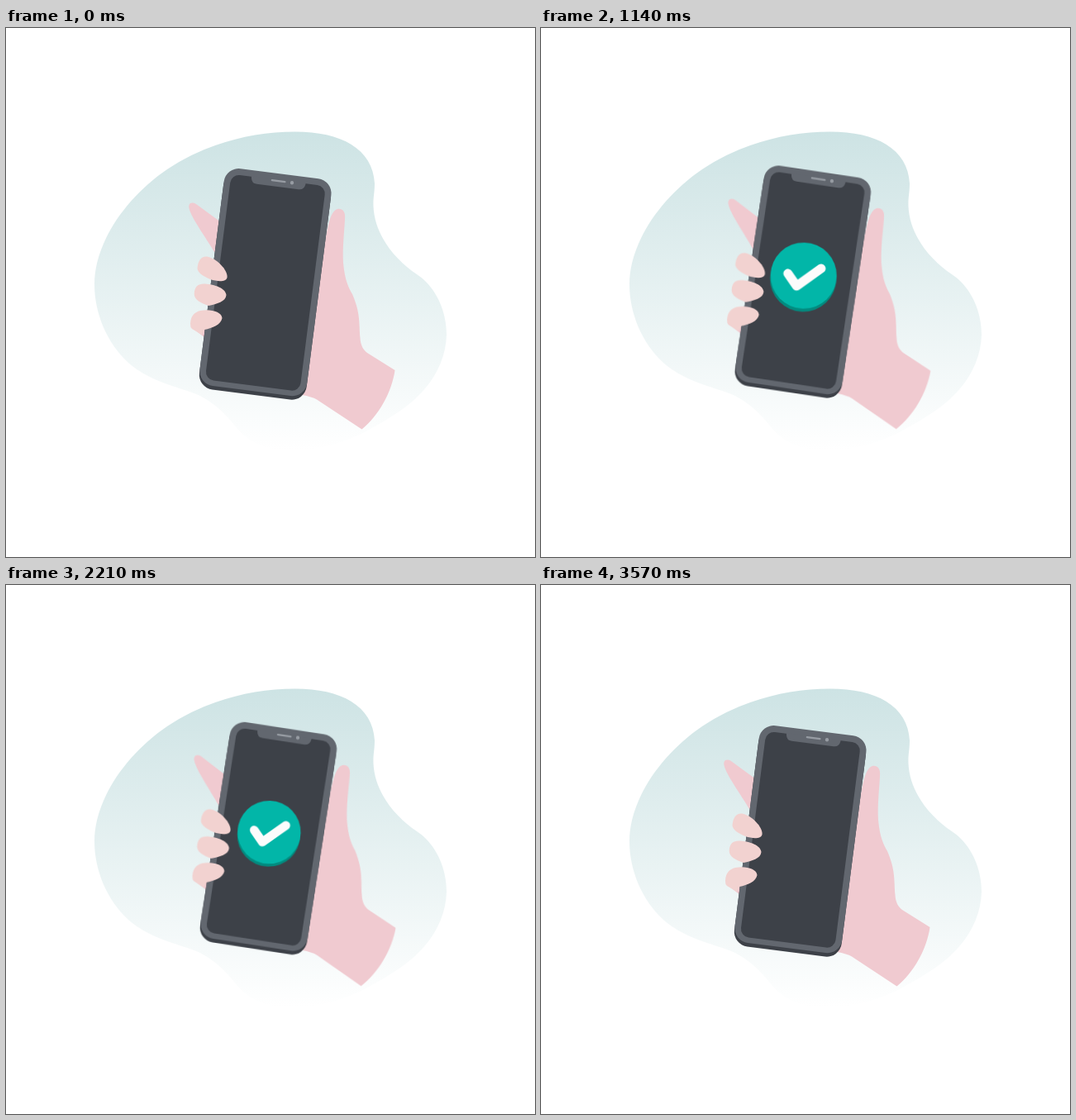
These frames come from a looping animation (640 px wide and 640 px high, 3.64 s). An HTML page:

```html
<!DOCTYPE html>
<html lang="en">
<head>
<meta charset="utf-8">
<title>Phone confirmation</title>
<style>
  html, body { margin: 0; width: 100%; height: 100%; overflow: hidden; background: #fff; }
  svg { display: block; width: 100vw; height: 100vh; }

  .hand { transform-origin: 442px 450px; animation: tilt 3640ms linear infinite; }
  .badge { transform-origin: 0 0; animation: pop 3640ms ease-in-out infinite, fade 3640ms ease-in-out infinite; }

  .skin { fill: #f0cad0; }
  .finger { fill: #f2d2d0; }
  .case { fill: #62676f; }
  .dark { fill: #3d4148; }
  .detail { fill: #979ca3; }

  @keyframes tilt {
    0%, 98.08%, 100% { transform: rotate(0deg); }
    49.04% { transform: rotate(2deg); }
  }
  @keyframes pop {
    0%, 15.66% { transform: scale(.5); }
    32.2% { transform: scale(1.085); }
    45%, 54.95% { transform: scale(1); }
    68.68% { transform: scale(1.085); }
    79.67%, 100% { transform: scale(.5); }
  }
  @keyframes fade {
    0%, 15.66% { opacity: 0; }
    32.97%, 58.79% { opacity: 1; }
    79.67%, 100% { opacity: 0; }
  }
</style>
</head>
<body>
<svg viewBox="0 0 640 640">
  <defs>
    <linearGradient id="sky" gradientUnits="userSpaceOnUse" x1="0" y1="125" x2="0" y2="511">
      <stop offset="0" stop-color="#cde3e4"/>
      <stop offset="1" stop-color="#fff"/>
    </linearGradient>
  </defs>

  <path fill="url(#sky)" d="M350 125.5C405 125.5 444 146 446 188C446 200 444 205 444.5 216C446 250 470 280 497 298C520 313 533 342 533 371C532 410 508 442 477 463C440 488 400 510 350 511C320 512 298 505 280 485C262 462 245 448 225 441C200 432 172 426 148 405C122 381 107 345 107 310C107 260 145 205 195 171C240 141 295 125.5 350 125.5Z"/>

  <g class="hand">
    <g class="skin">
      <path d="M384 268C389 245 391 222 401 219C408 218 411 223 410 232C409 250 407 266 408 284C410 305 414 313 419 322C429 345 427 357 428.5 375C429 384 432 389 437 393L470.5 414C467 440 451 469 430.5 485.5L376 449.5Q370 446 358 444L350 400Z"/>
      <path d="M264 238L258 233.5L230 213C225 210 220 212 221.5 218C224 230 243 255 252 271L262 272Z"/>
      <path d="M224 362L241 375L246 362Z"/>
    </g>

    <g transform="translate(313.95 307.6) rotate(7.3)">
      <rect class="dark" x="-65.4" y="-128" width="130.8" height="265" rx="18"/>
      <rect class="case" x="-65.4" y="-132.5" width="130.8" height="265" rx="18"/>
      <rect class="dark" x="-57.7" y="-124.5" width="115.4" height="250.5" rx="10.5"/>
      <path class="case" d="M-33 -125.5H33V-123.5Q32 -116.5 25.5 -116.5H-25.5Q-32 -116.5 -33 -123.5Z"/>
      <rect class="detail" x="-9" y="-124.5" width="18" height="2.2" rx="1.1"/>
      <circle class="detail" cx="16.5" cy="-123.5" r="2.2"/>
    </g>

    <g transform="translate(314.4 302.4)">
      <g class="badge">
        <circle cx="-.4" cy="3.4" r="37" fill="#008c80"/>
        <circle r="37" fill="#00b8a9"/>
        <path d="M-17.6 -2L-7.6 11.8L19.4 -8.4" fill="none" stroke="#fff" stroke-width="10.2" stroke-linecap="round" stroke-linejoin="round"/>
      </g>
    </g>

    <g class="finger">
      <path d="M231.5 291C232 282 236 276 243 276.5C254 278 269 293 267.5 302C266 307.5 256 307 247 304C238 300 232 296 231.5 291Z"/>
      <path d="M227.7 322C228 312 233 309 241 309.5C252 310 266 315 266.5 323C266 331 255 334 245 336C236 333 228 329 227.7 322Z"/>
      <path d="M223 358C223.500 348 228 344 235 342C247 339.500 261 343 261.500 351C260 359 250 363 240 365L237 371L225 364Q222.800 362 223 358Z"/>
    </g>
  </g>
</svg>
</body>
</html>
```
